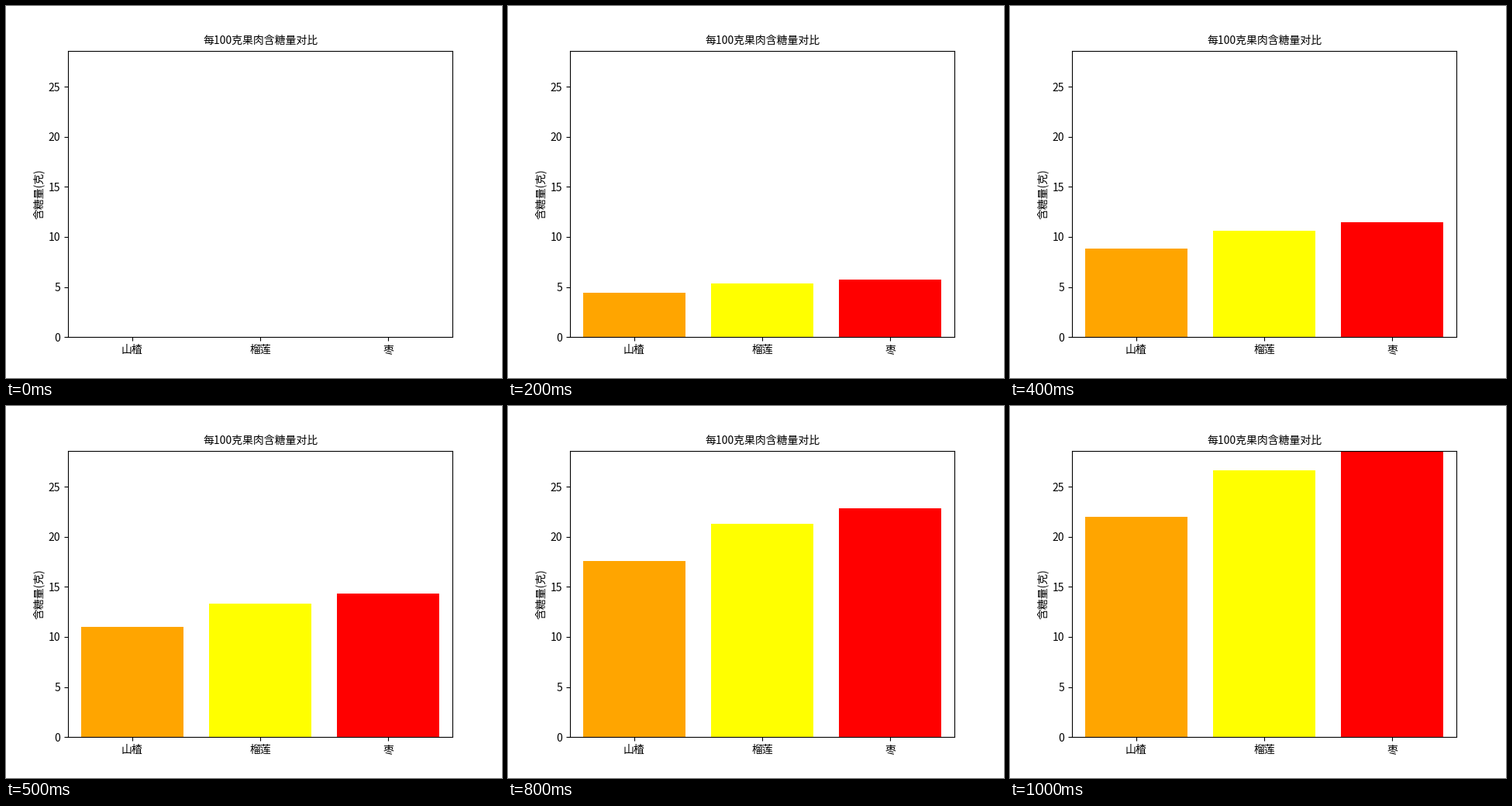
These frames come from a looping animation (640 by 480 pixels, 1100 ms). A matplotlib script:

```python
import matplotlib.pyplot as plt
from matplotlib.animation import FuncAnimation

plt.rcParams["font.family"] = "Noto Sans CJK JP"
plt.rcParams["font.size"] = 10

FRUITS = ["山楂", "榴莲", "枣"]
SUGAR = [22, 26.6, 28.6]
COLORS = ["orange", "yellow", "red"]
STEPS = 10

fig, ax = plt.subplots(figsize=(6.4, 4.8), dpi=100)
bars = ax.bar(FRUITS, [0] * len(FRUITS), color=COLORS)
ax.set_xlim(-0.5, len(FRUITS) - 0.5)
ax.set_ylim(0, max(SUGAR))
ax.set_yticks(range(0, 26, 5))
ax.set_title("每100克果肉含糖量对比", fontsize=10)
ax.set_ylabel("含糖量(克)")


def update(step):
    for bar, value in zip(bars, SUGAR):
        bar.set_height(value * step / STEPS)
    return list(bars)


anim = FuncAnimation(fig, update, frames=STEPS + 1, interval=100,
                     repeat=True, repeat_delay=0)
plt.show()
```
